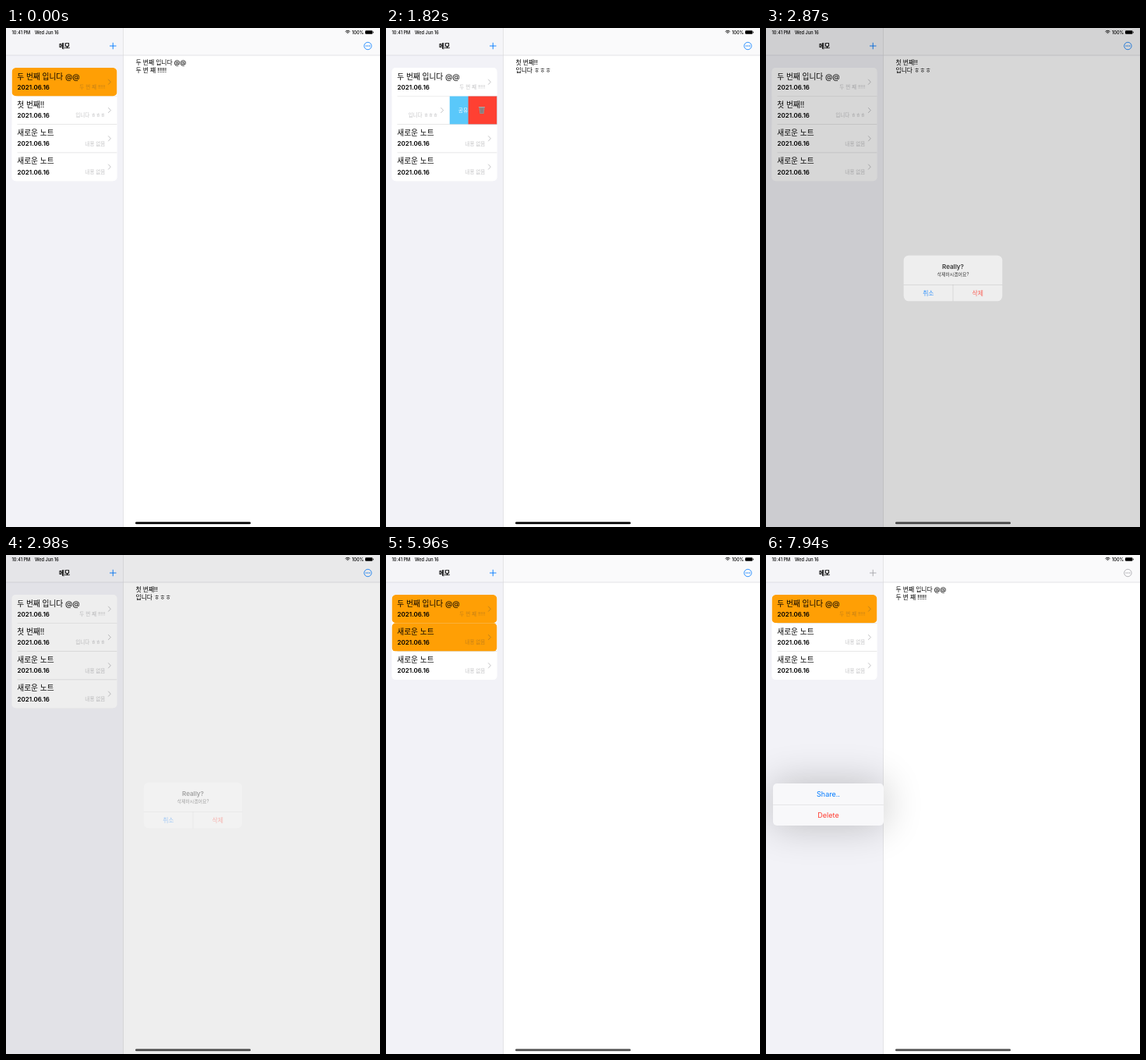
Animation, 480 px wide and 640 px high, one loop 8000 ms. Source, as an HTML page with a canvas:

```html
<!DOCTYPE html>
<html lang="ko">
<head>
<meta charset="utf-8">
<title>메모</title>
<style>
html, body { margin: 0; width: 100%; height: 100%; overflow: hidden; background: #fff; }
canvas { display: block; width: 480px; height: 640px; }
</style>
</head>
<body>
<canvas id="stage"></canvas>
<script>
const LOOP = 8000, W = 480, H = 640;
const ROW = { x: 7.5, y: 51, w: 135, h: 36.3 };
const BLUE = '#007aff', RED = '#ff3b30', FAINT = 'rgba(60,60,67,.3)', LINE = 'rgba(60,60,67,.2)';
const FONT = "Inter, 'Noto Sans CJK KR', 'Noto Sans CJK JP', 'Noto Sans CJK', sans-serif";

const SECOND = { title: '두 번째 입니다 @@', body: '두 번 쨰 !!!!!' };
const FIRST = { title: '첫 번째!!', body: '입니다 ㅎㅎㅎ' };
const EMPTY = { title: '새로운 노트', body: '내용 없음' };

const CHANGES = [
  [0], [500], [1030, 1820, 8], [1930, 2720, 8], [2870, 3200, 4],
  [3420, 3760, 4], [5960], [6990], [7210, 7320, 2]
].flatMap(([from, to = from, n = 1]) =>
  Array.from({ length: n }, (_, i) => from + (to - from) * i / Math.max(1, n - 1)));

const canvas = document.getElementById('stage');
const ctx = canvas.getContext('2d');
const ratio = window.devicePixelRatio || 1;
canvas.width = W * ratio;
canvas.height = H * ratio;

const ease = (t, from, to) => {
  const p = Math.min(1, Math.max(0, (t - from) / (to - from)));
  return p * p * (3 - 2 * p);
};

function rect(x, y, w, h, fill) {
  ctx.fillStyle = fill;
  ctx.fillRect(x, y, w, h);
}

function rounded(x, y, w, h, r, fill) {
  ctx.beginPath();
  ctx.roundRect(x, y, w, h, r);
  if (fill) { ctx.fillStyle = fill; ctx.fill(); }
}

function circle(x, y, r) {
  ctx.beginPath();
  ctx.arc(x, y, r, 0, Math.PI * 2);
}

function path(points, color, width) {
  ctx.beginPath();
  points.forEach(([x, y]) => ctx.lineTo(x, y));
  ctx.strokeStyle = color;
  ctx.lineWidth = width;
  ctx.stroke();
}

function text(str, x, y, size, color = '#000', weight = 400, align = 'left') {
  ctx.font = `${weight} ${size}px ${FONT}`;
  ctx.textAlign = align;
  ctx.fillStyle = color;
  ctx.fillText(str, x, y);
}

function layer(paint) {
  ctx.save();
  paint();
  ctx.restore();
}

function statusBar() {
  text('10:41 PM', 7.5, 7.6, 5.6, '#000', 500);
  text('Wed Jun 16', 37, 7.6, 5.6, '#000', 500);
  ctx.strokeStyle = '#000';
  ctx.lineWidth = .9;
  for (const r of [1, 2.6, 4.2]) {
    ctx.beginPath();
    ctx.arc(438.5, 7.6, r, -Math.PI * .75, -Math.PI * .25);
    ctx.stroke();
  }
  text('100%', 444, 7.6, 5.6, '#000', 500);
  rounded(461, 3.3, 9.5, 4.5, 1.2, '#000');
  rect(471, 4.7, .7, 1.7, '#000');
}

function icons(t) {
  const fade = t >= 7210 ? 1 : t < 2870 ? alertIn(t) : 0;
  const mix = (a, b) => Math.round(a + (b - a) * fade);
  const tint = `rgb(${mix(0, 165)},${mix(122, 165)},${mix(255, 170)})`;
  path([[133, 23], [141.5, 23]], tint, .9);
  path([[137.25, 18.8], [137.25, 27.2]], tint, .9);
  layer(() => {
    if (t >= 6990 && t < 7210) ctx.globalAlpha = .4;
    circle(464.4, 23, 4.7);
    ctx.strokeStyle = ctx.fillStyle = tint;
    ctx.lineWidth = .8;
    ctx.stroke();
    for (const dx of [-2.2, 0, 2.2]) {
      circle(464.4 + dx, 23, .7);
      ctx.fill();
    }
  });
}

function cell(note, y, selected) {
  if (selected) rounded(ROW.x, y, ROW.w, ROW.h, 5, '#ff9f05');
  text(note.title, 14.3, y + 14.5, 9.7);
  text('2021.06.16', 14.5, y + 27.6, 8, '#000', 600);
  text(note.body, 127.3, y + 27, 6.56, FAINT, 400, 'right');
  path([[131.2, y + 14.8], [134.3, y + 18.2], [131.2, y + 21.6]], FAINT, 1);
}

function trash(x, y) {
  ctx.beginPath();
  [[-3.6, -3], [3.6, -3], [2.6, 5], [-2.6, 5]].forEach(([dx, dy]) => ctx.lineTo(x + dx, y + dy));
  ctx.fillStyle = '#98898a';
  ctx.fill();
  path([[x - 4, y - 3.4], [x + 4, y - 3.4]], '#b0a3a3', 1);
  for (const dx of [-1.4, 0, 1.4]) path([[x + dx, y - 2], [x + dx * .8, y + 4]], '#776a6b', .5);
}

function swipeActions(y, open) {
  const right = ROW.x + ROW.w, middle = 17.4;
  const shareX = right - open;
  const deleteX = right - Math.min(open, 43 * (1 - Math.exp(-open / 31)));
  rect(shareX, y, open, ROW.h, '#5ac8fa');
  text('공유', shareX + middle, y + 20.6, 6.8, '#fff', 500, 'center');
  rect(deleteX, y, right - deleteX, ROW.h, '#ff4032');
  trash(deleteX + middle, y + 17.6);
}

function selectedNotes(t) {
  if (t < 500) return [0];
  if (t < 1030) return [1];
  if (t < 3420) return [];
  if (t < 5960) return [2];
  return t < 6990 ? [0, 2] : [0];
}

function list(t) {
  const removed = ease(t, 3320, 3760);
  const open = 70 * (ease(t, 960, 1480) - ease(t, 1720, 2160));
  const selected = selectedNotes(t);
  const rowY = i => ROW.y + ROW.h * (i > 1 ? i - removed : i);
  const notes = [SECOND, FIRST, EMPTY, EMPTY];

  layer(() => {
    rounded(ROW.x, ROW.y, ROW.w, ROW.h * (4 - removed), 5, '#fff');
    ctx.clip();
    for (const i of [1, 0, 2, 3]) {
      if (i === 1 && removed === 1) continue;
      const y = rowY(i);
      layer(() => {
        if (i === 1) ctx.globalAlpha = 1 - removed;
        else rect(ROW.x, y, ROW.w, ROW.h, '#fff');
        if (i > 0) rect(14.5, y - .3, 128, .6, LINE);
        layer(() => {
          if (i === 1) ctx.translate(-open, 0);
          cell(notes[i], y, selected.includes(i));
        });
        if (i === 1 && open > 0) swipeActions(y, open);
      });
    }
  });
}

function detail(t) {
  const note = t < 500 || t >= 6990 ? SECOND : t < 3420 ? FIRST : null;
  if (!note) return;
  text(note.title, 166.5, 47, 7.8, '#000', 500);
  text(note.body, 166.5, 57.4, 7.8, '#000', 500);
}

const alertIn = t => t <= 1820 ? 0 : 1 - Math.exp((1820 - t) / 105);

function alertBox(t) {
  const shown = alertIn(t) * (1 - ease(t, 2760, 3120));
  if (shown <= 0) return;
  rect(0, 0, W, H, `rgba(0,0,0,${.2 * shown})`);
  layer(() => {
    const scale = 1.17 - .17 * alertIn(t);
    ctx.globalAlpha = shown;
    ctx.translate(240, 321);
    ctx.scale(scale, scale);
    rounded(-63.3, -29.3, 126.6, 58.6, 6.5, 'rgba(247,247,247,.95)');
    text('Really?', 0, -12.2, 8, '#000', 600, 'center');
    text('삭제하시겠어요?', 0, -3, 5.9, '#000', 400, 'center');
    rect(-63.3, 8.3, 126.6, .5, FAINT);
    rect(-.25, 8.3, .5, 21, FAINT);
    text('취소', -31.7, 21.8, 7.8, BLUE, 400, 'center');
    text('삭제', 31.7, 21.8, 7.8, RED, 400, 'center');
  });
}

function popover(t) {
  if (t < 7210) return;
  layer(() => {
    ctx.globalAlpha = t < 7320 ? .5 : 1;
    layer(() => {
      ctx.shadowColor = 'rgba(0,0,0,.24)';
      ctx.shadowBlur = 50 * ratio;
      rounded(9, 293, 142, 54, 5, '#f8f8fa');
    });
    rect(9, 320, 142, .5, LINE);
    text('Share..', 80, 310.2, 9, BLUE, 400, 'center');
    text('Delete', 80, 337.2, 9, RED, 400, 'center');
  });
}

function draw(t) {
  ctx.setTransform(ratio, 0, 0, ratio, 0, 0);
  rect(0, 0, W, H, '#fff');
  rect(0, 0, 150, H, '#f2f2f7');
  rect(0, 0, 150, 35, '#f5f5f8');
  rect(151, 0, W - 151, 35, '#fafafb');
  rect(0, 34.7, W, .6, '#d2d2d6');
  rect(150, 0, .7, H, '#d8d8dc');
  statusBar();
  text('메모', 75, 25.6, 7.7, '#000', 600, 'center');
  icons(t);
  list(t);
  detail(t);
  rounded(166, 633.6, 148, 2.6, 1.3, t < 1930 ? '#000' : '#505050');
  alertBox(t);
  popover(t);
}

function tick() {
  const now = performance.now() % LOOP;
  draw(CHANGES.findLast(change => change <= now));
  requestAnimationFrame(tick);
}
tick();
</script>
</body>
</html>
```
